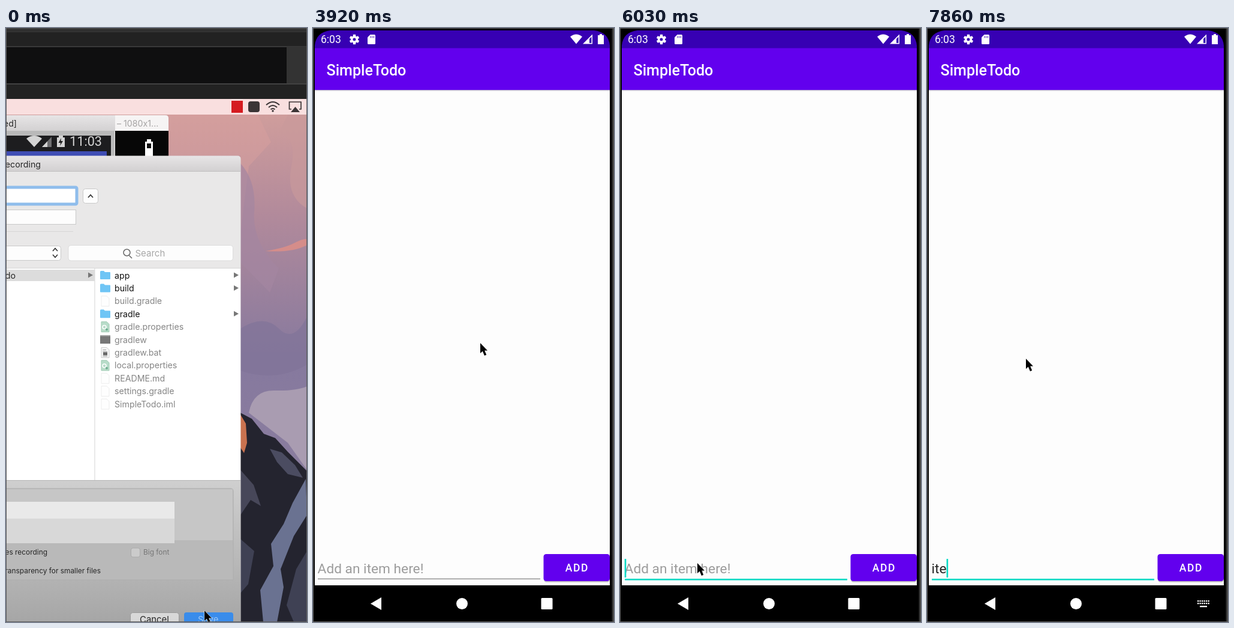
An HTML page for the animation above (8 s loop, 502 by 988 pixels).

```html
<!DOCTYPE html>
<html lang="en">
<head>
<meta charset="utf-8">
<title>SimpleTodo demo</title>
<style>
html, body { margin: 0; width: 100%; height: 100%; overflow: hidden; background: #000; }
svg { display: block; width: 502px; height: 988px; }
text { white-space: pre; }
.mac { font-family: Inter, sans-serif; font-size: 14.2px; fill: #262626; }
.droid { font-family: Roboto, sans-serif; }
.end { text-anchor: end; }
</style>
</head>
<body>
<svg viewBox="0 0 502 988">
  <defs>
    <linearGradient id="sky" x1="0" y1="0" x2="0" y2="1">
      <stop offset="0" stop-color="#d4a09c"/>
      <stop offset=".22" stop-color="#b28a9b"/>
      <stop offset=".5" stop-color="#86799e"/>
      <stop offset=".8" stop-color="#8c7f9f"/>
      <stop offset="1" stop-color="#a598ad"/>
    </linearGradient>
    <linearGradient id="footer" x1="0" y1="0" x2="0" y2="1">
      <stop offset="0" stop-color="#cfcfcf"/>
      <stop offset=".65" stop-color="#b5b5b5"/>
      <stop offset="1" stop-color="#a6a6a6"/>
    </linearGradient>
    <linearGradient id="titleBar" x1="0" y1="0" x2="0" y2="1">
      <stop offset="0" stop-color="#e7e5e6"/>
      <stop offset="1" stop-color="#d2d0d1"/>
    </linearGradient>
    <path id="pointer" d="M0 0V17L3.8 13.6 7 21 10.2 19.6 7.2 12.4H12Z" fill="#000" stroke="#fff" paint-order="stroke"/>
    <path id="folder" d="M0 1.5Q0 0 1.5 0H6L8 2H16Q17 2 17 3V13Q17 14 16 14H1Q0 14 0 13Z" fill="#6fc5f5"/>
    <path id="sheet" d="M2 0H11L15 4V17H2Z"/>
  </defs>

  <g id="desktop">
    <rect width="502" height="988" fill="#222"/>
    <path d="M0 3H502M0 31H502" stroke="#393939" stroke-width="2"/>
    <path d="M0 6H502" stroke="#4a4a4a"/>
    <rect y="32" width="468" height="60" fill="#0f0f10"/>
    <rect x="468" y="31" width="34" height="62" fill="#333"/>
    <path d="M0 93H502" stroke="#424242" stroke-width="2"/>

    <rect y="118" width="502" height="870" fill="url(#sky)" />
    <path d="M271 144H420L442 190 405 230 391 340V212H271Z" fill="#d9a09d" opacity=".45"/>
    <path d="M391 225Q418 255 414 305T455 400L440 440 391 390Z" fill="#a486a1" opacity=".7"/>
    <path d="M470 144H502V300Q466 280 476 230T455 175Z" fill="#c99a9c" opacity=".65"/>
    <path d="M433 371Q465 366 480 358T502 351V361Q478 374 433 371Z" fill="#d58d8a"/>
    <path d="M391 500Q430 475 455 500T502 480V560Q450 590 391 570Z" fill="#807399" opacity=".65"/>
    <path d="M405 640Q412 602 448 603T502 596V735L470 690Z" fill="#a99cb1"/>
    <path d="M391 640L410 650 430 675 449 682 470 705 502 737V988H391Z" fill="#24242f"/>
    <path d="M391 643L400 658 402 690 397 707 391 698Z" fill="#c9724f"/>
    <path d="M440 700L460 706 482 727 495 748 470 742 452 722Z" fill="#4b4c61"/>
    <path d="M391 735L413 760 425 795 408 785 391 810Z" fill="#474759"/>
    <path d="M500 750L478 790 463 825 442 858 446 895 424 935 429 988H452L463 930 458 900 480 845 502 810Z" fill="#6a7291"/>
    <path d="M468 960L484 900 502 870V988H480ZM391 850L414 870 404 925 391 940Z" fill="#3f4154"/>

    <rect y="118" width="502" height="26" fill="#f9dfdf"/>
    <rect x="376" y="121" width="19" height="20" fill="#d51b20"/>
    <rect x="404" y="122" width="19" height="18" rx="4" fill="#3b3536"/>
    <g fill="none" stroke="#3b3536" stroke-width="2">
      <path d="M434 128Q445 118 456 128M438 132Q445 125.500 452 132M441.500 135.500Q445 132.500 448.500 135.500"/>
      <path d="M476 135H472.500V123H492V135H489" stroke-width="1.700"/>
    </g>
    <circle cx="445" cy="138" r="1.700" fill="#3b3536"/>
    <path d="M482.500 131L490 140H475Z" fill="#3b3536"/>

    <path d="M0 145H266Q271 145 271 150V213H0Z" fill="#f6f4f4"/>
    <rect y="145" width="182" height="27" fill="url(#titleBar)"/>
    <text class="mac end" x="18" y="164">Emulated]</text>
    <text class="mac" x="185" y="164" style="fill:#a5a3a3">– 1080x1...</text>
    <path d="M0 171H181V213H0Z" fill="#b9b9b9"/>
    <rect y="179" width="175" height="34" fill="#1d1d1f"/>
    <rect y="205" width="168" height="8" fill="#3f4db4"/>
    <rect x="182" y="171" width="89" height="42" fill="#070707"/>
    <path d="M235 185H242V189H245V213H232V189H235Z" fill="#fff"/>
    <rect x="235" y="192" width="7" height="8" fill="#111"/>
    <g fill="#d4d4d4">
      <path d="M34 184Q47 174 60 184L47 198Z"/>
      <path d="M60 198L76 181V198Z" opacity=".45"/>
      <path d="M60 198L69 188.500V198Z"/>
      <path d="M85 182H88V179H95V182H98V198H85Z"/>
      <text class="droid" x="106" y="196" font-size="21.700">11:03</text>
    </g>
    <path d="M92 183L87.500 191H91L90 196 95 188H91.500Z" fill="#222"/>

    <path d="M0 212.500H386Q391.500 212.500 391.500 218V988H0Z" fill="#e9e8e8"/>
    <path d="M0 213H386Q391 213 391 218V238H0Z" fill="url(#titleBar)"/>
    <path d="M0 238.500H391" stroke="#c2c1c1"/>
    <text class="mac end" x="58" y="232">Save recording</text>
    <rect x="-10" y="265" width="128" height="28" rx="2" fill="#fff" stroke="#8fbdec" stroke-width="5"/>
    <g fill="#fdfdfd" stroke="#c9c9c9">
      <rect x="128.500" y="267.500" width="25" height="24" rx="4"/>
      <rect x="-5" y="302.500" width="121.500" height="24"/>
      <rect x="-5" y="362.500" width="96.500" height="24" rx="4"/>
      <rect x="104" y="361.500" width="274.500" height="25.500" rx="4" stroke="#dcdcdc"/>
    </g>
    <path d="M0 338.500H112" stroke="#d6d6d6"/>
    <g fill="none" stroke="#333" stroke-width="1.800">
      <path d="M137 282L141 277.500 145 282"/>
      <path d="M78 371L82 366.500 86 371M78 377L82 381.500 86 377" stroke-width="1.600"/>
      <path d="M205.500 378.500L210 383M207 373.500A5.500 5.500 0 1 1 196 373.500A5.500 5.500 0 1 1 207 373.500" stroke="#666" stroke-width="1.500"/>
    </g>
    <text class="mac" x="215.500" y="380" style="font-size:15px;fill:#a7a7a7">Search</text>

    <rect y="399" width="391" height="353" fill="#fff"/>
    <path d="M0 399.500H391M148 400V752" stroke="#d5d5d5"/>
    <rect y="402" width="148" height="19" fill="#dcdcdc"/>
    <text class="mac end" x="16" y="416.500">SimpleTodo</text>
    <path d="M137 406.500L145 411 137 415.500Z" fill="#777"/>
    <g id="files"></g>

    <rect y="752" width="391" height="236" fill="url(#footer)"/>
    <path d="M0 752.500H391" stroke="#b5b5b5"/>
    <path d="M-2 766H375Q379 766 379 770V918H-2Z" fill="#b9b9b9" stroke="#adadad"/>
    <path d="M0 767H378V852H0Z" fill="#c6c6c6"/>
    <rect y="788" width="281" height="28" fill="#e9e9e9"/>
    <rect y="816" width="281" height="41" fill="#d8d8d8"/>
    <rect x="208.500" y="865" width="15" height="15" rx="3" fill="#cbcbcb" stroke="#aaa"/>
    <g class="mac" style="font-size:11.900px">
      <text class="end" x="69" y="875.500">Optimises recording</text>
      <text class="end" x="158" y="907">Use transparency for smaller files</text>
      <text x="229" y="875.500" fill="#777">Big font</text>
    </g>
    <rect x="207.500" y="972.500" width="81" height="24" rx="4" fill="#d8d8d8" stroke="#999"/>
    <rect x="297" y="972" width="82" height="24" rx="4" fill="#398ceb"/>
    <text class="mac" x="223" y="988.500" style="font-size:14.900px">Cancel</text>
    <text class="mac" x="320" y="988.500" style="font-size:14.900px;fill:#9cc8f8">Save</text>
    <use href="#pointer" x="331" y="969"/>
  </g>

  <g id="phone" class="droid">
    <rect width="502" height="988" fill="#000"/>
    <rect x="498.500" width="2.500" height="988" fill="#343434"/>
    <path d="M3 34V29Q5 7 29 4H469Q493 7 495 29V34Z" fill="#3700b3"/>
    <rect x="3" y="103" width="492" height="824" fill="#fdfdfd"/>
    <rect x="3" y="103" width="492" height="1.500" fill="#c9c4d4"/>
    <rect x="3" y="33.500" width="492" height="69.500" fill="#6200ee"/>
    <text x="13" y="25.300" font-size="17.500" fill="#fff">6:03</text>
    <g fill="#fff">
      <circle cx="69" cy="19" r="4.300" fill="none" stroke="#fff" stroke-width="3.600"/>
      <g id="teeth"></g>
      <path d="M95.500 11H102.500Q104 11 104 12.500V25.500Q104 27 102.500 27H92.500Q91 27 91 25.500V15.500Z"/>
      <path d="M429 14.500Q439 6.500 449 14.500L439 26.500Z"/>
      <path d="M450 26.500L466 10.500V26.500Z"/>
      <path d="M475 12H478V10H482V12H485V27H475Z"/>
    </g>
    <path d="M96 13.500V16.500M98.800 13.500V16.500M101.500 13.500V16.500" stroke="#3700b3"/>
    <path d="M461 18V25H464.500V14.500Z" fill="#3700b3"/>
    <text x="22.500" y="78.700" font-size="25.100" font-weight="500" fill="#fff">SimpleTodo</text>

    <rect x="385" y="877" width="110" height="45" rx="4.500" fill="#000" opacity=".22"/>
    <rect x="384.500" y="875" width="110.500" height="45" rx="4.500" fill="#6200ee"/>
    <text x="420.800" y="904.300" font-size="17.500" font-weight="500" letter-spacing="1.560" fill="#fff">ADD</text>

    <text id="entry" x="7.600" y="907" font-size="22.700"></text>
    <rect id="line" x="8" width="371"/>
    <rect id="caret" y="883" width="2.600" height="31" fill="#03dac5"/>

    <g fill="#fff">
      <path d="M96 957.500L114 947V968Z"/>
      <circle cx="248.500" cy="957.500" r="9.500"/>
      <rect x="380.500" y="948" width="19" height="19" rx="1.500"/>
      <g id="keyboard"></g>
    </g>
    <use id="mouse" href="#pointer"/>
  </g>
  <rect x=".5" y=".5" width="501" height="987" fill="none" stroke="#5c5c5c"/>
</svg>
<script>
const LOOP = 8000;
const $ = id => document.getElementById(id);
const range = n => [...Array(n).keys()];

const files = [
  ['app', 'folder'], ['build', 'folder'], ['build.gradle', 'blank'], ['gradle', 'folder'],
  ['gradle.properties', 'config'], ['gradlew', 'shell'], ['gradlew.bat', 'script'],
  ['local.properties', 'config'], ['README.md', 'blank'], ['settings.gradle', 'blank'],
  ['SimpleTodo.iml', 'blank']
];
const sheet = (fill, stroke, extra = '') => `<use href="#sheet" y="-1" fill="${fill}" stroke="${stroke}"/>${extra}`;
const icons = {
  folder: '<use href="#folder"/>',
  blank: sheet('#fefefe', '#ececec'),
  config: sheet('#b8dcc9', '#9fcab3', '<circle cx="7" cy="8" r="3" fill="none" stroke="#fff" stroke-width="1.500"/><circle cx="11" cy="12" r="2" fill="#6fae90"/>'),
  shell: '<rect width="17" height="14" fill="#777"/><path d="M0 1H17" stroke="#999" stroke-width="2"/>',
  script: sheet('#f5f5f5', '#ccc', '<path d="M4.500 3H10M4.500 6H12M4.500 13.500H12" stroke="#999"/><rect x="5" y="7" width="7" height="5" fill="#666"/>')
};

$('files').innerHTML = files.map(([name, kind], i) => {
  const y = 411 + 21.4 * i;
  const isFolder = kind === 'folder';
  return `<g transform="translate(157 ${y - 7})">${icons[kind]}</g>
    <text class="mac" x="181" y="${y + 5.5}" style="fill:${isFolder ? '#111' : '#858585'}">${name}</text>
    ${isFolder ? `<path d="M380 ${y - 4.5}l8 4.500-8 4.500Z" fill="#777"/>` : ''}`;
}).join('');

$('teeth').innerHTML = range(6).map(i =>
  `<rect x="66.800" y="10.800" width="4.400" height="4" rx=".6" transform="rotate(${i * 60} 69 19)"/>`).join('');

$('keyboard').innerHTML = range(12).map(i =>
  `<rect x="${451 + i % 6 * 3.5}" y="${952 + Math.floor(i / 6) * 4}" width="2.300" height="2.300"/>`).join('') +
  '<rect x="455" y="961" width="12" height="2.300"/>';

// [start time, x, y] of each pointer position
const moves = [
  [2970, 351, 692], [3110, 291, 497], [3240, 285, 480], [3540, 285, 474],
  [3920, 279, 524], [4040, 251, 668], [4190, 205, 787], [4310, 173, 836],
  [4470, 127, 882], [4880, 128, 885], [5000, 129, 888], [5130, 129, 890],
  [6170, 140, 790], [6290, 160, 620], [6410, 165, 550]
];
const typed = [[0, ''], [7710, 'i'], [7860, 'ite']];
const caretSpans = [[5910, 6410], [6940, 7440], [7710, LOOP]];

const latest = (steps, t) => steps.findLast(([start]) => t >= start);
const show = (id, visible) => $(id).setAttribute('visibility', visible ? 'inherit' : 'hidden');
const set = (id, attrs) => Object.entries(attrs).forEach(([key, value]) => $(id).setAttribute(key, value));

function render(t) {
  const inApp = t >= 800;
  show('desktop', !inApp);
  show('phone', inApp);

  const move = latest(moves, t);
  show('mouse', move);
  if (move) set('mouse', { x: move[1], y: move[2] });

  const text = latest(typed, t)[1];
  $('entry').textContent = text || 'Add an item here!';
  set('entry', { fill: text ? '#222' : '#9c9c9c' });

  const focused = t >= 5910;
  const lineColor = t >= 6030 ? '#03dac5' : focused ? '#45aaa0' : '#868686';
  set('line', { y: focused ? 916 : 915.7, height: focused ? 2.6 : 1.3, fill: lineColor });

  show('caret', caretSpans.some(([from, to]) => t >= from && t < to));
  set('caret', { x: text ? 7.6 + $('entry').getComputedTextLength() - (text === 'i' ? 0.6 : 0) : 7.7 });
  show('keyboard', t >= 6170);
}

const begin = performance.now();
function tick() {
  render((performance.now() - begin) % LOOP);
  requestAnimationFrame(tick);
}
tick();
</script>
</body>
</html>
```
